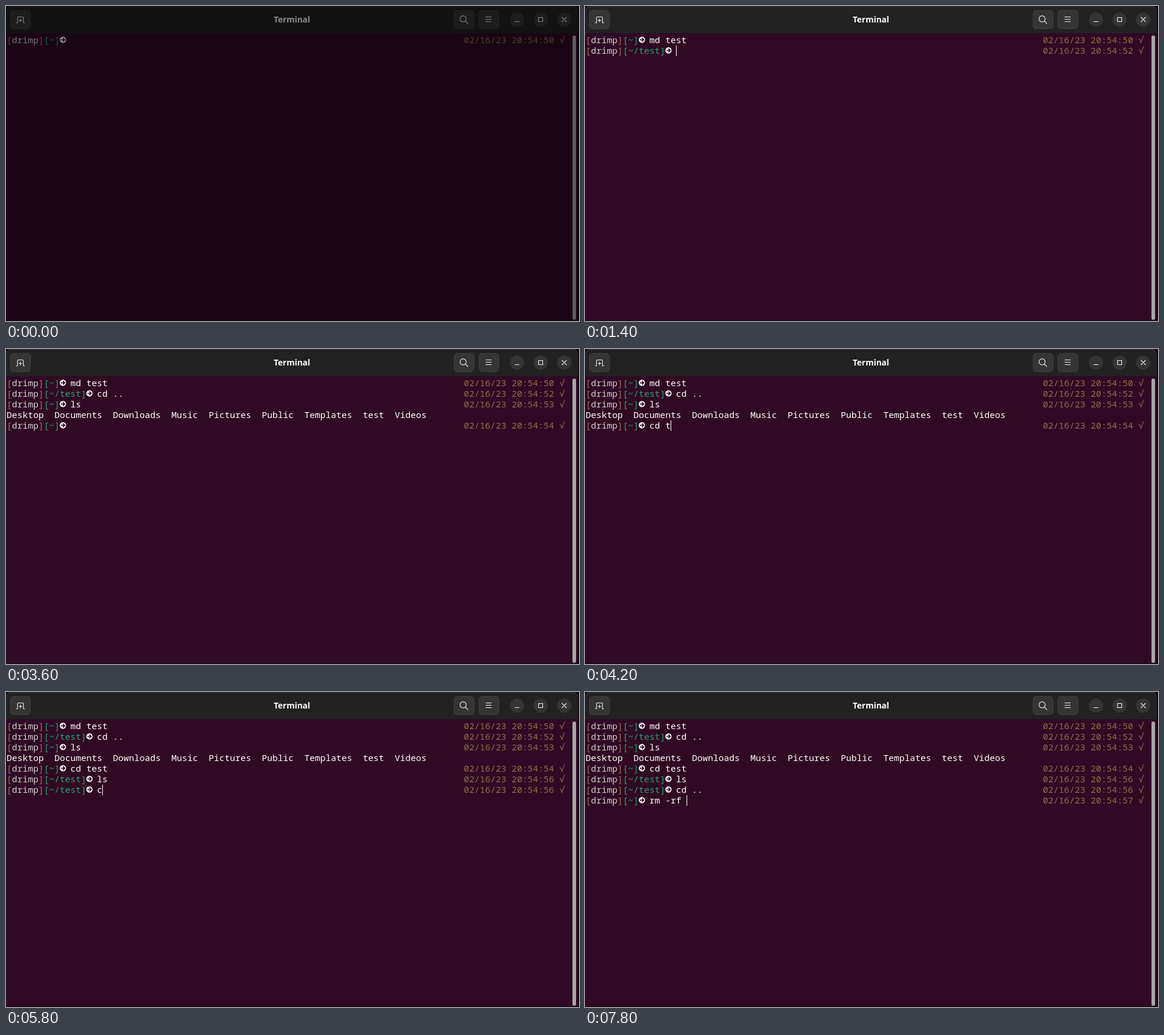
Write an HTML page that moves like this. It is 970 by 534 pixels and loops after 8000 ms.

```html
<!DOCTYPE html>
<html lang="en">
<head>
<meta charset="utf-8">
<title>Terminal</title>
<style>
  html, body { margin: 0; width: 100%; height: 100%; overflow: hidden; background: #16060f; }
  svg { display: block; width: 970px; height: 534px; }
  .title { font: 700 14px "Noto Sans", "Open Sans", sans-serif; fill: #fff; text-anchor: middle; }
  .button { fill: #353535; stroke: #3f3f3f; }
  .icon { fill: none; stroke: #f2f2f2; stroke-width: 1.1; }
  #screen text { font: 15px "Noto Sans Mono", "DejaVu Sans Mono", monospace; white-space: pre; fill: #fff; }
  #screen .frame, #screen .stamp { fill: #a2734c; }
  #screen .stamp { fill: #966b48; }
  #screen .user { fill: #d0cfcc; }
  #screen .path { fill: #28a078; }
  .tip { fill: none; stroke: #300a24; stroke-width: 1.7; }
  #shade { animation: reveal 8s step-end infinite; }
  @keyframes reveal { 0% { opacity: .46; } 2.5%, 100% { opacity: 0; } }
</style>
</head>
<body>
<svg viewBox="0 0 970 534">
  <path fill="#300a24" d="M0 46H968V533H0z"/>
  <path fill="#222" d="M0 46V9Q0 0 9 0H959Q968 0 968 9V46z"/>
  <path fill="none" stroke="#383838" d="M1 8Q2 .5 9 .5H959Q966 .5 967 8"/>
  <rect x="959" y="50" width="6" height="482" rx="3" fill="#aaa6a8"/>

  <text class="title" x="484" y="28">Terminal</text>
  <g class="button">
    <rect x="7.5" y="7.5" width="34" height="31" rx="5"/>
    <rect x="758.5" y="7.5" width="34" height="31" rx="5"/>
    <rect x="800.5" y="7.5" width="34" height="31" rx="5"/>
  </g>
  <g fill="#353535">
    <circle cx="865" cy="23" r="12"/>
    <circle cx="905" cy="23" r="12"/>
    <circle cx="945" cy="23" r="12"/>
  </g>
  <g class="icon">
    <path d="M17 28.5H19.5V20Q19.5 18.5 21 18.5H28Q29.5 18.5 29.5 20V28.5H32M21.5 24.5H27.5M24.5 21.5V27.5"/>
    <circle cx="773.8" cy="21.8" r="5.2"/>
    <path d="M777.5 25.5L782 30M812 18.5H822M812 22.5H822M812 26.5H822"/>
    <path d="M861 26.5H869M901.5 19.5H908.5V26.5H901.5zM941 19L949 27M949 19L941 27"/>
  </g>

  <g id="screen"></g>
  <rect id="cursor" width="1" height="18" fill="#fff"/>
  <rect id="shade" width="970" height="534"/>
</svg>
<script>
const LOOP = 8000, CELL = 9, LINE = 18, LEFT = 1, TOP = 49;
const USER = "drimp";

// Each prompt: row, time it appears, directory, clock seconds, [time, typed so far]
const prompts = [
  { row: 0, at: 0, dir: "~", sec: 50, keys: [[400, "m"], [600, "md "], [800, "md te"], [1000, "md test"]] },
  { row: 1, at: 1400, dir: "~/test", sec: 52, keys: [[1600, "c"], [1800, "cd "], [2000, "cd ."], [2200, "cd .."]] },
  { row: 2, at: 2400, dir: "~", sec: 53, keys: [[2600, "l"], [2800, "ls"]] },
  { row: 4, at: 3000, dir: "~", sec: 54, keys: [[3800, "c"], [4000, "cd"], [4200, "cd t"], [4400, "cd te"], [4600, "cd test"]] },
  { row: 5, at: 4800, dir: "~/test", sec: 56, keys: [[5000, "l"], [5200, "ls"]] },
  { row: 6, at: 5400, dir: "~/test", sec: 56, keys: [[5800, "c"], [6000, "cd "], [6200, "cd ."], [6400, "cd .."]] },
  { row: 7, at: 6800, dir: "~", sec: 57, keys: [[7000, "rm"], [7200, "rm -"], [7400, "rm -rf"], [7800, "rm -rf "]] }
];
const listing = "Desktop  Documents  Downloads  Music  Pictures  Public  Templates  test  Videos";

const screen = document.getElementById("screen");
const cursor = document.getElementById("cursor");
const colX = col => LEFT + col * CELL;

function add(parent, tag, attrs, text = "") {
  const el = document.createElementNS("http://www.w3.org/2000/svg", tag);
  for (const name in attrs) el.setAttribute(name, attrs[name]);
  el.textContent = text;
  return parent.appendChild(el);
}

function addRow(row) {
  return add(screen, "g", { transform: `translate(0 ${TOP + row * LINE})` });
}

function write(group, col, text, cls = "") {
  return add(group, "text", { x: colX(col), y: 14, class: cls }, text);
}

for (const p of prompts) {
  const g = p.group = addRow(p.row);
  const pathCol = USER.length + 2;
  const arrowCol = pathCol + p.dir.length + 2;
  write(g, 0, "[", "frame");
  write(g, 1, USER, "user");
  write(g, pathCol - 1, "]", "frame");
  write(g, pathCol, `[${p.dir}]`, "path");
  const x = colX(arrowCol) + 5.3;
  add(g, "circle", { cx: x, cy: 8.3, r: 5.3, fill: "#fff" });
  add(g, "path", { class: "tip", d: `M${x - 3.5} 8.3h6.5M${x} 5.2l3.1 3.1l-3.1 3.1` });
  write(g, 86, `02/16/23 20:54:${p.sec} √`, "stamp");
  p.col = arrowCol + 2;
  p.input = write(g, p.col, "");
}

const output = addRow(3);
write(output, 0, listing);

const show = (el, on) => el.setAttribute("visibility", on ? "visible" : "hidden");

function draw(now) {
  const t = now % LOOP;
  let last;
  for (const p of prompts) {
    show(p.group, t >= p.at);
    if (t < p.at) continue;
    p.typed = "";
    for (const [time, text] of p.keys) if (t >= time) p.typed = text;
    if (p.input.textContent !== p.typed) p.input.textContent = p.typed;
    last = p;
  }
  show(output, t >= 3000);
  show(cursor, t >= 400 && !(t >= 3600 && t < 3800));
  cursor.setAttribute("x", colX(last.col + last.typed.length));
  cursor.setAttribute("y", TOP + last.row * LINE);
  requestAnimationFrame(draw);
}
draw(performance.now());
</script>
</body>
</html>
```
